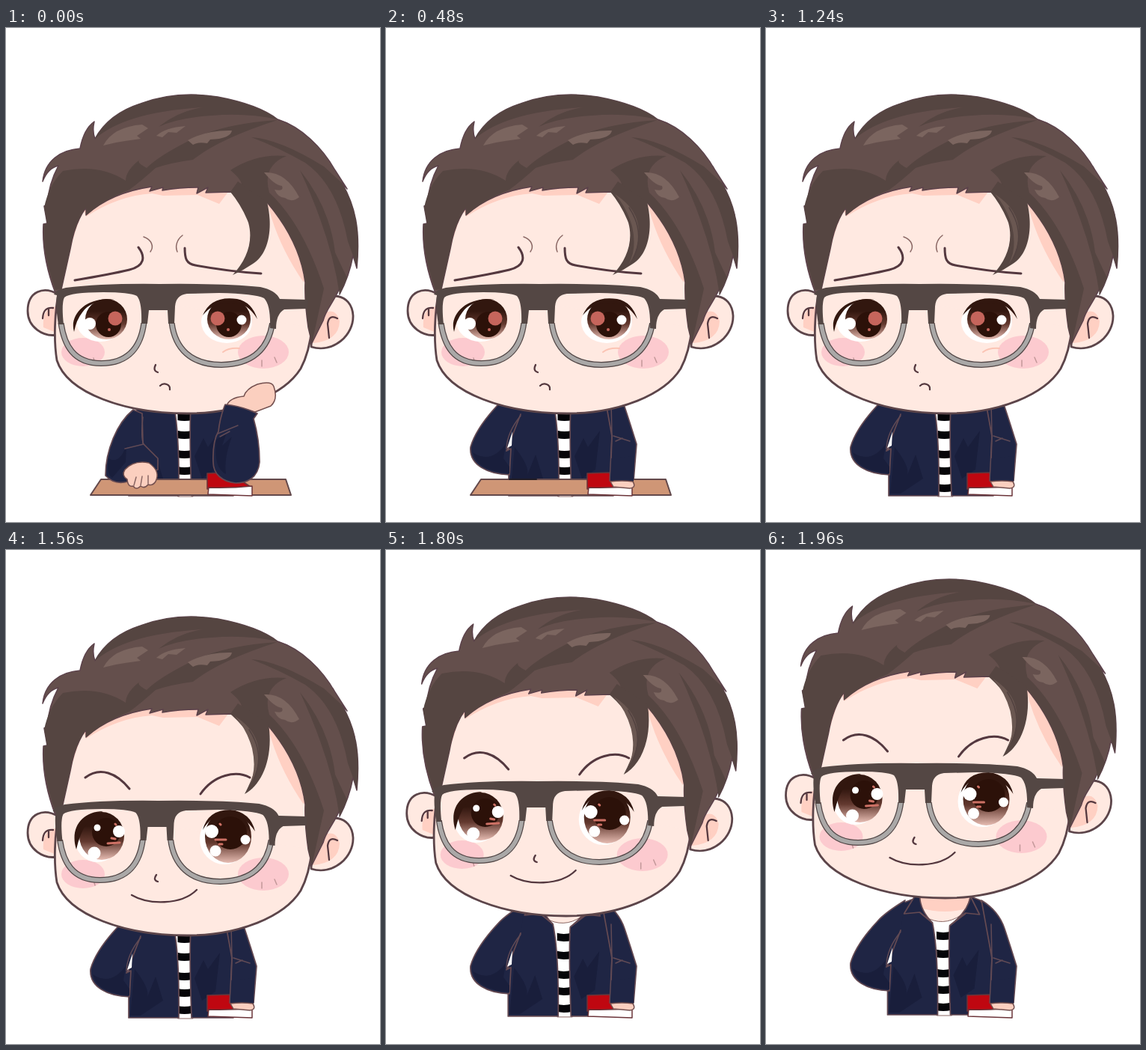
An HTML page that plays this animation: 500 px wide and 660 px high, repeating every 2 s.

```html
<!DOCTYPE html>
<html lang="en">
<head>
<meta charset="utf-8">
<title>Sad to happy</title>
<style>
html, body { margin: 0; width: 100%; height: 100%; overflow: hidden; background: #fff; }
svg { display: block; width: 500px; height: 660px; }
path, ellipse, circle { stroke-linecap: round; stroke-linejoin: round; }
.ink { stroke: #5c454a; stroke-width: 2.8; }
.line { fill: none; stroke: #54383f; stroke-width: 3; }
.fine { stroke-width: 2.3; }
.thin { fill: none; stroke: #8a6764; stroke-width: 1.5; }
.skin { fill: #ffe9e1; }
.hand { fill: #fbcfbf; stroke: #74504f; stroke-width: 1.5; }
.coat { fill: #1f2544; stroke: #654a52; stroke-width: 1.7; }
.fold { fill: #191e3b; }
.seam { fill: none; stroke: #604a55; stroke-width: 1.5; }
.shade { fill: #ffd0c3; }
.dark { fill: #554541; }
.shine { fill: #7b655f; }
.cheek { fill: #fcc3cb; opacity: .8; }
.pupil { fill: #2c1109; }
.red { fill: #c5655c; }
</style>
</head>
<body>
<svg viewBox="0 0 500 660">
<defs>
  <linearGradient id="iris" x1="0" y1="0" x2="0" y2="1">
    <stop offset=".3" stop-color="#32170f"/>
    <stop offset=".62" stop-color="#63392f"/>
    <stop offset="1" stop-color="#e6bcb2"/>
  </linearGradient>
  <clipPath id="low"><path d="M60,394H370V460H60Z"/></clipPath>
  <clipPath id="tee"><path d="M229,490H249V626H231Z"/></clipPath>
</defs>

<g id="torso">
  <path class="skin" d="M207,455H275V505H207Z"/>
  <path class="shade" d="M207,455H275V482Q240,492 207,482Z"/>
  <path fill="#fff" stroke="#8a6764" d="M214,494Q238,508 262,492L250,626H230Z"/>
  <path id="stripes" clip-path="url(#tee)" fill="none" stroke="#050509" stroke-width="10"/>
  <path class="coat" d="M207,467L186,475L174,512L164,560V625H231Q232,540 224,502L207,488Z"/>
  <path class="coat" d="M275,467L288,472L302,492L312,520L304,625H248Q245,540 247,506L268,490Z"/>
  <path class="coat" d="M200,467L186,490L207,488L224,502Q208,486 207,467Z M275,467L287,491L268,489L248,505Q272,486 275,467Z"/>
  <path class="fold" d="M172,560Q192,585 189,597L200,570L210,602L180,622H166Z M252,572L264,548L270,560L286,538L280,590L262,602Z"/>
</g>
<g id="armL2">
  <path class="coat" d="M186,476Q160,492 150,503Q120,535 113,560C111,584 136,596 165,597L167,562L161,565L180,516"/>
  <path fill="#fff" d="M169,539L162,561L168,558Z"/>
  <path class="fold" d="M116,567Q140,583 160,556L157,575L165,586V595Q122,592 116,567Z"/>
  <path class="seam" d="M180,518Q162,540 161,562"/>
</g>
<path id="armR2" class="coat" d="M288,468Q311,482 319,506Q327,530 335,556L331,605Q315,612 300,605L302,545Z"/>

<g id="desk">
  <path fill="#cf9676" stroke="#63494b" stroke-width="2" d="M127,603H374L381,624H113Z"/>
  <path id="edge" fill="none" stroke="#211c24" stroke-width="2" d="M165,603H201"/>
</g>
<g stroke="#6b3439" stroke-width="1.5">
  <path fill="#bf0710" d="M269,595L298,594L327,613L269,616Z"/>
  <path fill="#fff" d="M271,614Q300,615 329,612V625L270,623Z"/>
</g>
<g id="palm">
  <path class="coat" d="M299,575L332,572L331,606L300,605Z" style="stroke:none"/>
  <path class="hand" d="M300,606Q316,604 330,606Q335,614 326,615L304,613Z"/>
  <path class="seam" d="M301,500L302,545L299,605M304,545L326,552M307,552L316,548"/>
</g>

<g id="head">
  <path class="skin ink" d="M70,356C50,344 29,352 29,378C29,400 50,413 68,410Z M410,372C430,350 462,354 464,384C465,410 438,435 408,426Z"/>
  <path class="shade" d="M66,372Q48,374 50,400L67,407Z M410,390Q440,366 446,392Q445,418 410,421Z"/>
  <path class="line fine" d="M63,374Q50,372 49,388M57,375V384M443,388Q432,382 430,395L432,414"/>
  <path class="skin" d="M72,340L68,300L75,225L200,185L340,200L412,300L409,400H66Z"/>
  <path class="skin ink" d="M72,345C64,380 64,420 68,444C82,488 160,515 242,515C312,515 372,490 394,455C402,440 407,420 409,400"/>
  <path class="shade" d="M107,252Q150,224 195,221L210,224L256,223L285,235L300,215L190,195L100,235Z M349,232Q362,288 398,340L405,320L390,270L350,225Z M100,250L78,318L74,300Z"/>
  <ellipse class="cheek" cx="103" cy="433" rx="29" ry="19"/>
  <ellipse class="cheek" cx="344" cy="433" rx="34" ry="22"/>
  <path class="thin" opacity=".5" d="M117,441L119,448M342,444V452M359,440L362,447"/>

  <g id="sad">
    <path class="line" d="M92,337Q140,329 165,323C185,318 187,306 177,293M239,294C239,308 241,315 253,317C275,321 310,326 341,328"/>
    <path class="thin" d="M184,279C195,283 198,292 193,299M236,277C228,283 226,292 229,299"/>
    <path fill="none" stroke="#fbc4b4" stroke-width="2" d="M290,433Q298,427 312,428"/>
    <ellipse fill="#fff" cx="126" cy="392" rx="32" ry="27"/>
    <ellipse fill="#fff" cx="295" cy="393" rx="34" ry="28"/>
    <ellipse fill="url(#iris)" cx="134" cy="389" rx="28" ry="27"/>
    <ellipse fill="url(#iris)" cx="298" cy="389" rx="29" ry="27"/>
    <circle class="pupil" cx="137" cy="396" r="17"/>
    <circle class="pupil" cx="298" cy="396" r="17"/>
    <path fill="#32170f" d="M91,406C84,382 109,358 145,363Q112,364 102,380Q94,390 91,406Z M263,384Q274,357 309,362Q329,366 336,389Q323,366 300,367Q276,367 263,384Z"/>
    <circle fill="#fff" cx="112" cy="395" r="8"/>
    <circle fill="#fff" cx="315" cy="390" r="6.5"/>
    <circle class="red" cx="146" cy="388" r="9.5"/>
    <circle class="red" cx="283" cy="388" r="9.5"/>
    <circle class="red" cx="138" cy="403" r="2"/>
    <circle class="red" cx="297" cy="403" r="2"/>
    <path class="line fine" d="M200,450Q196,458 203,460M206,478C211,473 220,476 219,483"/>
  </g>

  <g id="happy" transform="translate(0 8)">
    <path class="line" d="M106,296C126,281 148,290 165,311M260,318C278,292 308,286 326,296"/>
    <ellipse fill="#fff" cx="122" cy="378" rx="30" ry="31"/>
    <ellipse fill="#fff" cx="292" cy="378" rx="33" ry="34"/>
    <ellipse fill="url(#iris)" cx="128" cy="374" rx="30" ry="32"/>
    <ellipse fill="url(#iris)" cx="297" cy="375" rx="31" ry="35"/>
    <circle class="pupil" cx="134" cy="369" r="19"/>
    <circle class="pupil" cx="300" cy="370" r="22"/>
    <path fill="#32170f" d="M94,392C85,364 101,341 130,341Q104,348 94,392Z M263,366Q270,339 300,339Q327,342 333,368Q318,345 295,345Q274,346 263,366Z"/>
    <g fill="#fff">
      <circle cx="151" cy="368" r="8"/><circle cx="118" cy="397" r="8.5"/><circle cx="122" cy="363" r="4.5"/>
      <circle cx="275" cy="368" r="9"/><circle cx="320" cy="379" r="6.5"/><circle cx="280" cy="394" r="7.5"/>
    </g>
    <path fill="none" stroke="#cd7165" stroke-width="3" d="M136,384L152,383M141,377L146,378M280,379L294,379M285,385H289M146,358L147,359M286,358L287,359"/>
    <path class="line fine" d="M201,426Q196,433 203,435M168,453C190,466 234,467 255,446"/>
  </g>

  <path fill="#644f4c" stroke="#5c424b" stroke-width="1.5" d="M66,354C55,325 48,295 50,262L55,261L51,238L55,236Q57,208 70,184Q56,187 49,205C52,177 73,163 99,161C102,145 108,132 118,125Q115,138 119,148C132,124 155,109 180,101C215,88 252,87 283,92C315,98 345,108 363,122C395,132 423,160 440,190L456,215L449,207C467,238 474,270 469,321L464,304Q459,331 446,356L448,342C441,364 428,374 424,391L409,421L404,400Q399,365 400,340Q393,285 349,233L300,219L267,220L270,213L255,221L257,213Q232,213 209,217L210,213L192,218L195,212Q140,220 107,250V240Q92,260 86,295L74,349Z"/>
  <path class="dark" d="M119,148C132,124 155,109 180,101C215,88 252,87 283,92C315,98 345,108 363,122Q320,113 275,117Q230,120 204,132Q230,111 263,106Q160,112 119,148Z
    M363,123Q285,128 240,153Q203,172 188,187Q172,179 180,175Q160,190 160,204Q125,181 76,191Q57,210 51,240L55,261L51,262Q48,300 66,350L74,349L86,295Q92,260 107,240V250Q130,230 165,216Q180,205 200,187Q220,180 250,176Q285,148 363,123Z
    M328,146Q365,148 425,185L449,207C467,238 474,270 469,318L457,285Q443,210 400,180Q365,160 328,146Z
    M300,190Q335,167 375,171Q342,184 352,220Q397,262 425,348L409,421L404,400Q399,365 400,340Q393,285 349,233L300,219Q330,215 300,190Z
    M393,190Q433,240 440,300L456,334L446,356Q435,280 393,190Z"/>
  <path class="shine" d="M130,157Q143,132 182,129L190,134L175,144L180,148L159,151L147,153Z M201,144Q213,133 240,131L228,140L217,139L209,146Z M243,150Q268,136 302,137Q300,148 273,149L269,154Q256,152 250,156Z M345,193Q374,191 392,226Q382,234 373,227Q364,227 359,216Q372,219 369,211Q359,210 345,193Z"/>
  <path id="lockSad" class="dark" d="M300,219Q315,237 324,260C331,285 322,310 303,330Q317,324 330,315C350,303 358,270 349,232L310,205Z"/>
  <path id="lockHappy" class="dark" d="M300,219Q320,237 330,255C341,280 331,303 319,326C342,314 358,278 351,232L310,205Z"/>
  <g id="glint">
    <path fill="#6a5751" d="M306,222Q344,246 337,285Q334,303 324,316Q336,296 329,265Q322,240 306,222Z"/>
    <path class="thin" style="stroke:#524240" d="M325,240Q347,273 331,307"/>
  </g>

  <g id="glasses">
    <g fill="none" clip-path="url(#low)">
      <g stroke="#514646" stroke-width="8"><path id="rim" d="M73,390C77,425 91,448 127,448C164,448 182,426 185,388M221,388C224,430 249,450 288,450C333,449 353,426 357,388"/></g>
      <use href="#rim" stroke="#aaa8a7" stroke-width="5.5"/>
    </g>
    <path fill="#544744" d="M64,356Q66,350 80,347Q130,341 205,342Q290,341 340,346Q360,350 366,362L404,363L403,375L372,376Q361,382 361,402L353,401Q354,370 345,361Q333,355 285,354L242,355Q227,357 226,372L225,395H217L216,377H191L189,395H181Q182,366 175,358Q165,353 130,353Q86,353 78,360Q74,368 77,396H70Q66,372 68,357Z"/>
  </g>
</g>

<g id="armL1">
  <path class="coat" d="M170,510C148,528 133,565 133,598Q145,611 163,606L203,590V575L183,555L182,515Z"/>
  <path class="fold" d="M137,575Q151,584 161,558L160,580L142,601Q134,596 137,575Z"/>
  <path class="seam" d="M183,520Q180,548 184,556L159,562"/>
  <path class="hand" d="M159,590Q171,577 191,581Q207,592 200,606Q196,612 190,610Q185,616 180,612Q174,618 170,612Q163,614 162,603Q154,598 159,590Z"/>
  <path class="thin" d="M171,611L174,600M180,611L182,599M190,609V598"/>
</g>
<g id="armR1">
  <path class="hand" d="M295,505Q298,494 318,492Q321,482 336,476Q355,471 358,479Q364,496 354,505L333,513Z"/>
  <path class="coat" d="M293,503Q315,505 336,515L331,522Q339,550 339,580C337,602 321,608 307,608C289,606 277,596 277,580Q276,552 284,539Q286,520 293,503Z"/>
  <path class="fold" d="M281,550L295,540L289,558L302,546Q291,575 294,596Q277,588 281,550Z"/>
  <path class="seam" d="M283,542L310,531M286,546L299,539"/>
</g>
</svg>
<script>
const LOOP = 2000, STEP = 40;
const el = id => document.getElementById(id);
const clamp = v => Math.max(0, Math.min(1, v));
const fade = (ids, v) => ids.forEach(id => el(id).setAttribute('opacity', v));
const move = (id, x, y) => el(id).setAttribute('transform', `translate(${x} ${y})`);

el('stripes').setAttribute('d', [519, 543, 569, 591, 614]
  .map(y => `M226,${y - 1}Q238,${y + 3} 252,${y - 1}`).join(''));

function draw(now) {
  const t = Math.floor(now % LOOP / STEP) * STEP;

  // arms come down
  const p = t < 120 ? 0 : clamp((t - 80) / 400);
  fade(['armL1', 'armR1'], 1 - p);
  fade(['armL2', 'armR2', 'palm', 'glint', 'edge'], p);
  el('armL1').setAttribute('transform', `rotate(${p * 16} 172 512)`);

  // desk slides away
  const k = t < 1000 ? 0 : Math.min(7, (t - 1000) / STEP + 1);
  move('desk', 27 * k, 0);
  fade(['desk'], 1 - k / 7);

  // face cheers up, then the head rises
  const glad = t >= 1560;
  fade(['sad', 'lockSad'], glad ? 0 : 1);
  fade(['happy', 'lockHappy'], glad ? 1 : 0);
  move('glasses', glad ? -1.5 : 0, glad ? -7 : 0);
  const lift = Math.max(0, .15 * t - 244);
  move('head', -.05 * lift, -lift);
  move('torso', -.03 * lift, -.08 * lift);
  move('armL2', 0, -.16 * lift);
  requestAnimationFrame(tick);
}

let start;
function tick(now) {
  start ??= now;
  draw(now - start);
}
draw(0);
</script>
</body>
</html>
```
